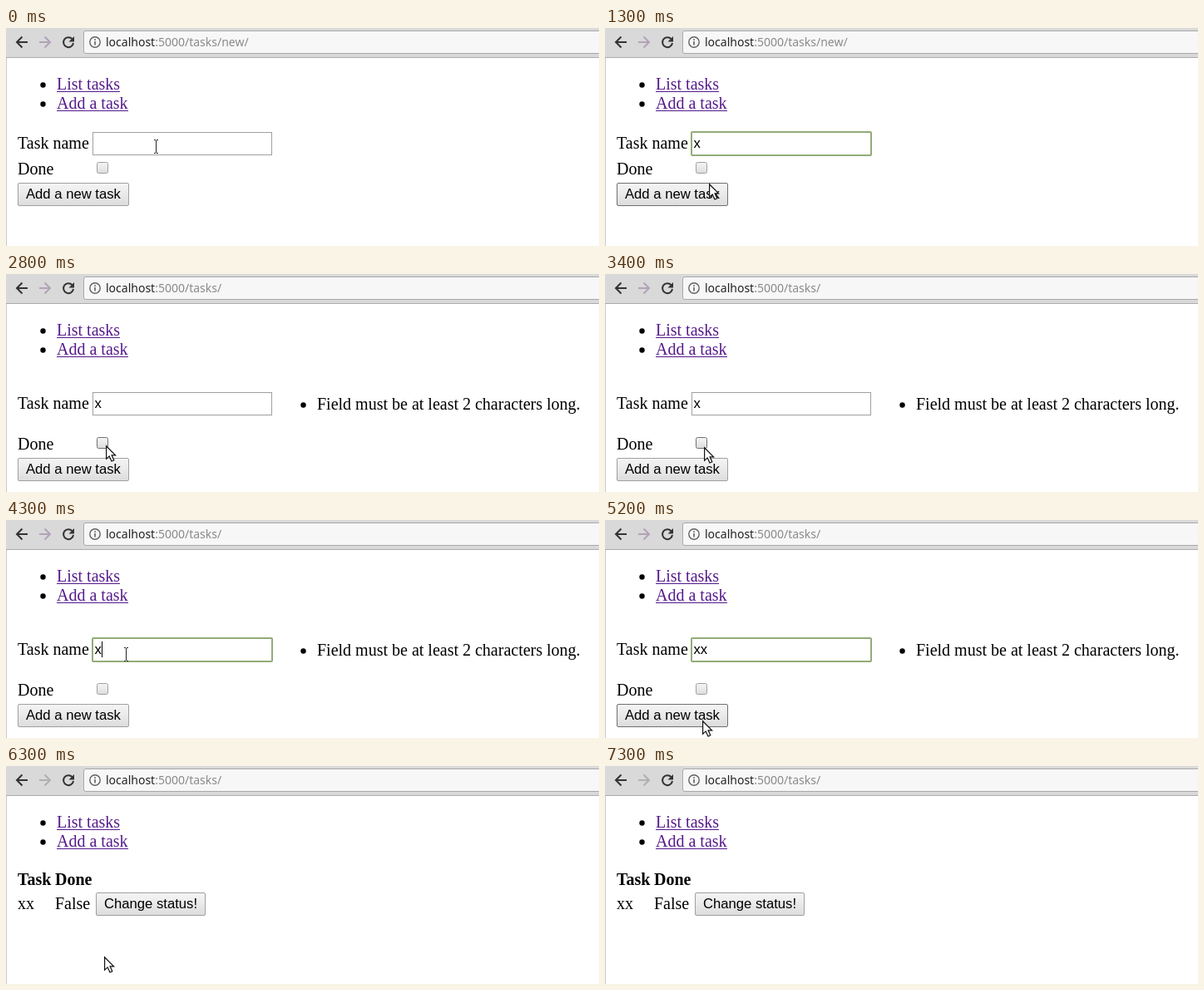
Write an HTML page that moves like this. It is 713 px wide and 262 px high and loops after 7.9 s.

```html
<!DOCTYPE html>
<html lang="en">
<head>
<meta charset="utf-8">
<title>Task form</title>
<style>
  html, body { margin: 0; width: 100%; height: 100%; overflow: hidden; background: #fff; }
  svg { display: block; }
  text { white-space: pre; }
  .serif { font: 20px "Liberation Serif", serif; }
  .bold { font-weight: bold; }
  .link { fill: #551a8b; }
  .sans { font: 16.667px "Liberation Sans", sans-serif; }
  .url { font: 14px "Noto Sans", sans-serif; fill: #222; }
  .icon { fill: none; stroke: #333; stroke-width: 2; }
</style>
</head>
<body>
<svg width="713" height="262" viewBox="0 0 713 262">
  <defs>
    <linearGradient id="face" x2="0" y2="1">
      <stop stop-color="#f4f4f4"/><stop offset=".4" stop-color="#ececec"/><stop offset="1" stop-color="#dcdcdc"/>
    </linearGradient>
  </defs>
  <g id="scene"></g>
</svg>
<script>
const LOOP = 7900, TICK = 100;
const scene = document.getElementById('scene');

// Pointer stops: time, x, y
const path = [
  [0, 180, 142], [200, 180, 142], [500, 204, 212], [800, 204, 212],
  [1300, 125, 187], [1600, 124, 192], [1800, 124, 192], [1900, 120, 196],
  [2700, 120, 196], [3000, 120, 226], [3100, 120, 226], [3400, 119, 208],
  [3900, 144, 161], [4400, 144, 161], [4700, 130, 220], [5200, 117, 241],
  [5500, 118, 234], [6000, 118, 234], [6300, 118, 229], [6500, 118, 216],
  [6600, 118, 216], [7200, 102, 0]
];

const between = (t, from, to) => t >= from && t < to;

function pointerAt(t) {
  const i = path.findIndex(stop => stop[0] > t);
  if (i < 0) return path[path.length - 1].slice(1);
  const [t0, x0, y0] = path[i - 1], [t1, x1, y1] = path[i];
  const k = (t - t0) / (t1 - t0);
  return [Math.round(x0 + (x1 - x0) * k), Math.round(y0 + (y1 - y0) * k)];
}

const inside = ([px, py], x, y, w, h) => px >= x && px < x + w && py >= y && py < y + h;
const text = (x, y, str, cls = 'serif') => `<text x="${x}" y="${y}" class="${cls}">${str}</text>`;
const box = (x, y, w, h, fill, stroke, r = 0) =>
  `<rect x="${x + .5}" y="${y + .5}" width="${w - 1}" height="${h - 1}" rx="${r}" fill="${fill}" stroke="${stroke}"/>`;
const bullet = (x, y) => `<circle cx="${x}" cy="${y}" r="3.2"/>`;
const icon = (d, color = '#333') => `<path class="icon" d="${d}" style="stroke:${color}"/>`;

function link(y, str, width) {
  return bullet(44.5, y - 5.5) + text(61, y, str, 'serif link') +
    `<rect class="link" x="61" y="${y + 2}" width="${width}" height="1"/>`;
}

function button(x, y, w, label, pointer) {
  const hover = inside(pointer, x, y, w, 28);
  return box(x, y, w, 28, 'url(#face)', hover ? '#707070' : '#a0a0a0', 1.5) +
    text(x + 10, y + 19, label, 'sans');
}

function toolbar(address, loading, forwardColor) {
  const reload = icon('M79.6 13.2A6 6 0 1 0 81 18') + '<path d="M82 10v6.5h-6.5z" fill="#333"/>';
  return '<rect width="713" height="35" fill="#d9d9d9"/><rect y="35" width="713" height="1" fill="#acacac"/>' +
    '<rect y="36" width="1" height="226" fill="#c8c8c8"/>' +
    icon('M26 17H13.5M19.5 10.5L13 17L19.5 23.5') +
    icon('M40 17H52.5M46.5 10.5L53 17L46.5 23.5', forwardColor) +
    (loading ? icon('M69.5 11.5L80.5 22.5M80.5 11.5L69.5 22.5') : reload) +
    box(93, 3, 630, 28, '#f7f7f7', '#a9a9a9', 2.5) +
    '<circle cx="107" cy="17" r="6.2" fill="none" stroke="#606060" stroke-width="1.4"/>' +
    '<path d="M106.2 16h1.6v4.5h-1.6zM106.2 13.3h1.6v1.6h-1.6z" fill="#606060"/>' +
    text(120, 22, `localhost<tspan fill="#8a8a8a">:5000${address}</tspan>`, 'url');
}

function form(t, pointer, invalid) {
  const fieldY = invalid ? 142 : 125, doneY = invalid ? 211 : 176;
  const value = t < 700 ? '' : t < 4400 ? 'x' : 'xx';
  const focused = between(t, 300, 2100) || between(t, 4000, 5600);
  const caret = between(t, 300, 1200) || between(t, 1900, 2100) || between(t, 4000, 4900);
  const checkHover = inside(pointer, 109, doneY - 15, 14, 14);
  return text(14, fieldY + 20, 'Task name') +
    box(104, fieldY, 216, 28, '#fff', '#a0a0a0') +
    (focused ? `<rect x="104" y="${fieldY}" width="216" height="28" rx="1" fill="none" stroke="#92ac78" stroke-width="2"/>` : '') +
    text(106.5, fieldY + 19, value, 'sans') +
    (caret ? `<rect x="${107 + Math.round(value.length * 8.33)}" y="${fieldY + 4}" width="1" height="19"/>` : '') +
    text(14, doneY, 'Done') +
    box(109, doneY - 15, 14, 14, 'url(#face)', checkHover ? '#707070' : '#a0a0a0', 2) +
    button(14, doneY + 10, 134, 'Add a new task', pointer) +
    (invalid ? bullet(357.5, 157.5) + text(374, 163, 'Field must be at least 2 characters long.') : '');
}

function taskList(pointer) {
  return text(14, 143, 'Task', 'serif bold') + text(59, 143, 'Done', 'serif bold') +
    text(14, 172, 'xx') + text(59, 172, 'False') +
    button(108, 152, 132, 'Change status!', pointer);
}

function cursor([x, y], isText) {
  const shape = isText
    ? '<path d="M-2.5-7.5H2.5M-2.5 7.5H2.5M.5-7.5V7.5" fill="none" stroke="#fff" stroke-width="3"/>' +
      '<path d="M-2-7.5H0M1-7.5H3M-2 8.5H0M1 8.5H3M.5-7V8" fill="none" stroke="#222"/>'
    : '<path d="M.6.8V16.2L4.2 12.9L7 19L9.8 17.8L7.1 11.8H11.6Z" fill="#fff" stroke="#111" stroke-width="1.2"/>';
  return `<g transform="translate(${x} ${y})">${shape}</g>`;
}

function render(t) {
  const pointer = pointerAt(t);
  const invalid = t >= 2200, listed = t >= 5700;
  const loading = between(t, 2100, 2300) || between(t, 5600, 5800);
  const overField = !listed && inside(pointer, 104, invalid ? 142 : 125, 216, 28);
  scene.innerHTML =
    toolbar(invalid ? '/tasks/' : '/tasks/new/', loading, listed ? '#b0b0b0' : '#b3a2b8') +
    link(74, 'List tasks', 76) + link(97, 'Add a task', 86) +
    (listed ? taskList(pointer) : form(t, pointer, invalid)) +
    (t < 7300 ? cursor(pointer, overField) : '');
}

let shown = -1;
function frame() {
  const t = Math.floor(performance.now() % LOOP / TICK) * TICK;
  if (t !== shown) render(shown = t);
  requestAnimationFrame(frame);
}
frame();
</script>
</body>
</html>
```
